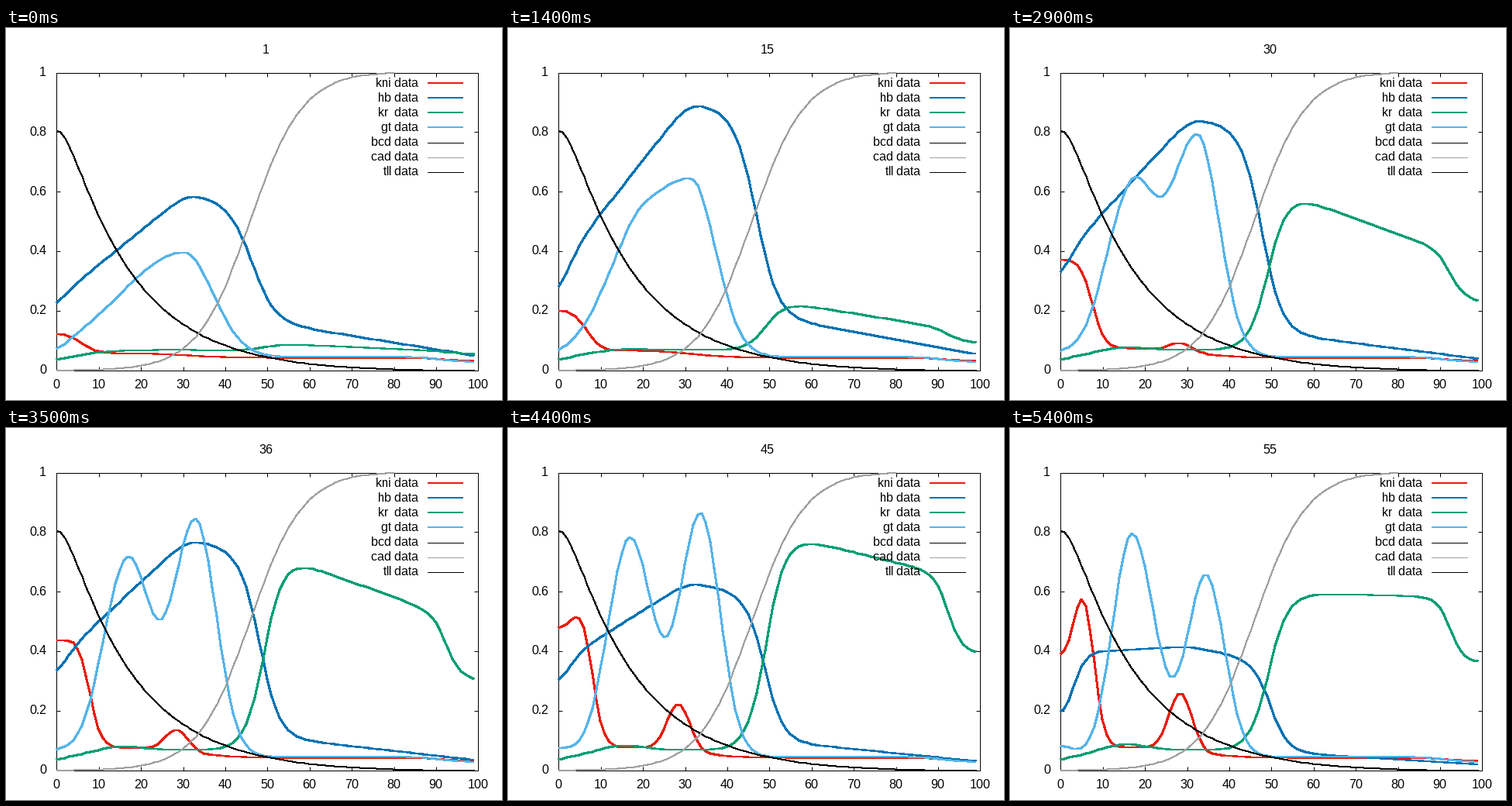
These frames come from a looping animation (640x480 px, 5500 ms). A matplotlib script:

```python
import numpy as np
import matplotlib.pyplot as plt
from matplotlib.animation import FuncAnimation
from matplotlib.lines import Line2D
from matplotlib.transforms import Affine2D

W, H, DPI = 640, 480, 100
PX = 72 / DPI  # one pixel in points
LEFT, RIGHT, TOP, BOTTOM = 65.4, 609.4, 57.6, 441.6
SPAN_X, SPAN_Y = 544, 384
FRAMES, INTERVAL = 55, 100

plt.rcParams.update({
    "font.family": "Liberation Sans",
    "font.size": 16 * PX,
    "text.hinting": "default",
    "text.hinting_factor": 1,
})

x = np.arange(100)
u = np.linspace(0, 1, FRAMES)[:, None]  # progress through the loop


def track(*levels):
    """Polynomial in time through evenly spaced levels."""
    n = len(levels)
    return np.polyval(np.polyfit(np.linspace(0, 1, n), levels, n - 1), u)


def rise(v, center, scale):
    return 1 / (1 + np.exp(-(v - center) / scale))


def bump(center, left, right=None):
    """Bell curve over x, with its own width on each side."""
    width = np.where(x < center, left, left if right is None else right)
    return np.exp(-((x - center) / width) ** 2 / 2)


def kni():
    base = 0.04 + track(0.015, 0.03, 0.035) * bump(18, 12) - 0.009 * rise(x, 91, 2.5)
    front = track(0.08, 0.15, 0.3, 0.42, 0.33) * rise(-x, -track(6, 8.8), track(2, 1.2))
    peak = 0.2 * u ** 6 * bump(5.3, 2)
    hump = 0.2 * rise(u, 0.7, 0.09) * bump(28.5, 2.7)
    return base + front + peak + hump


def hb():
    start = track(0.224, 0.277, 0.325, 0.32, 0.195)
    shelf = track(0.237, 0.34, 0.372, 0.358, 0.39)
    slope = track(0.0115, 0.018, 0.016, 0.0108, 0.0008)
    climb = x - 1.5 * np.logaddexp(0, (x - 31) / 1.5)
    body = shelf - (shelf - start) * bump(0, 3) + slope * climb - 0.003 * (x - climb)
    tail = track(0.137, 0.154, 0.112, 0.088, 0.052) * (2 - x / 60)
    return tail + (body - tail) * rise(-x, -track(46.5, 47.7, 50), track(2.7, 2.1))


def kr():
    base = 0.034 + 0.035 * np.tanh(x / 12) - 0.022 * (x / 100) ** 2
    hump = 0.022 * u * bump(15, 5)
    level = track(0.022, 0.145, 0.46, 0.7, 0.53)
    decline = 1 - track(0.42, 0.3, 0) * (x - 58) / 30
    return base + hump + level * decline * rise(x, 49.4, 2.3) * (1 - 0.41 * rise(x, 92.5, 1.6))


def gt():
    base = 0.044 - 0.018 * rise(x, 91, 2.5) + track(-0.02, 0.035) * bump(0, 3)
    front = track(0, 0.13, 0.51, 0.72, 0.75) * bump(17, track(7, 6.1, 4.5), 5.3)
    back = track(0.35, 0.59, 0.72, 0.82, 0.61) * bump(
        track(30.3, 34.5), track(15, 12.5, 7, 4.9, 4.4), track(6.9, 5.2, 4.4))
    return base + front + back


def bcd():
    level = 0.955 * np.exp(-0.06 * x) - 0.004 - 0.146 * np.exp(-x / 2.4)
    return np.maximum(level, 0)


def cad():
    level = 1.004 * rise(x, 45.9, 6.25)
    return np.where(level > 1, np.nan, level)


fig = plt.figure(figsize=(W / DPI, H / DPI), dpi=DPI, facecolor="white")
ax = fig.add_axes([LEFT / W, 1 - BOTTOM / H, SPAN_X / W, SPAN_Y / H])
ax.set(xlim=(0, 100), ylim=(0, 1), xticks=range(0, 101, 10), yticks=np.arange(6) / 5)
ax.tick_params(direction="in", length=5 * PX, width=PX, top=True, right=True,
               labelbottom=False, labelleft=False)
for spine in ax.spines.values():
    spine.set_linewidth(PX)


def label(px, py, text, align="center"):
    """Text with its baseline at pixel (px, py) from the top left."""
    return fig.text(px / W, 1 - py / H, text, ha=align, va="baseline")


for k in range(11):
    label(65 + k * SPAN_X / 10, 465, str(10 * k))
for k in range(6):
    label(52, round(446 - k * SPAN_Y / 5), f"{k / 5:g}", "right")
title = label(335, 33, "1")

SERIES = (
    ("kni data", "#e51e10", 2, kni()),
    ("hb data", "#0072b2", 2, hb()),
    ("kr  data", "#009e73", 2, kr()),
    ("gt data", "#56b4e9", 2, gt()),
    ("bcd data", "black", 1, bcd()),
    ("cad data", "#a0a0a0", 1, cad()),
    ("tll data", "black", 1, None),
)

grid_x = np.round(x * SPAN_X / 100) * 100 / SPAN_X
# Two-pixel strokes sit on pixel edges, one-pixel strokes on pixel centres.
on_edge = ax.transData + Affine2D().translate(-0.4, 0.6)

moving = []
for k, (name, color, width, data) in enumerate(SERIES):
    style = dict(color=color, lw=width * PX, solid_capstyle="butt", antialiased=False)
    y = 71 + 19 * k
    label(532, y + 5, name, "right")
    key_y = 1 - (y + (0.6 if width == 1 else 0)) / H
    fig.add_artist(Line2D([544 / W, 590 / W], [key_y, key_y], **style))
    if data is None:
        continue
    data = np.round(data * SPAN_Y) / SPAN_Y  # whole pixel rows
    line, = ax.plot(grid_x, np.atleast_2d(data)[0], clip_on=False, zorder=3 + k / 10, **style)
    if width == 2:
        line.set_transform(on_edge)
        moving.append((line, data))


def draw(frame):
    title.set_text(str(frame + 1))
    for line, data in moving:
        line.set_ydata(data[frame])
    return [title] + [line for line, _ in moving]


anim = FuncAnimation(fig, draw, frames=FRAMES, interval=INTERVAL, repeat=True)
plt.show()
```
